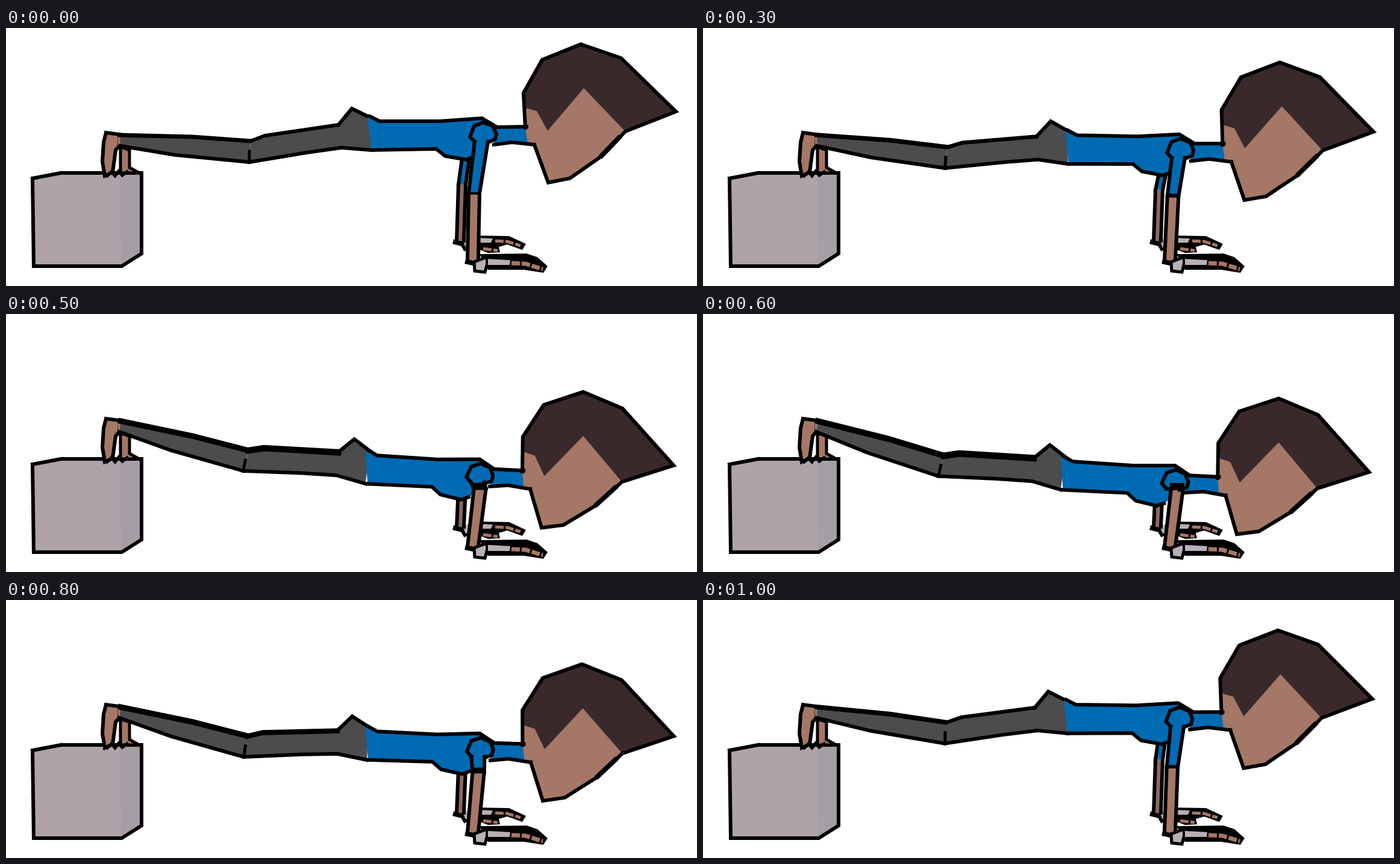
An HTML page with a canvas for the animation above (1100 ms loop, 1147 by 429 pixels).

```html
<!DOCTYPE html>
<html lang="en">
<head>
<meta charset="utf-8">
<title>Decline push-up</title>
<style>
html, body { margin: 0; width: 100%; height: 100%; overflow: hidden; background: #fff; }
canvas { display: block; }
</style>
</head>
<body>
<canvas id="stage" width="1147" height="429"></canvas>
<script>
const ctx = document.getElementById('stage').getContext('2d');
const INK = '#000', SKIN = '#a57766', SHADE = '#8c695f', HAIR = '#3a292b',
      PANTS = '#4c4b4e', SHIRT = '#006bb3', BAND = '#b9afb6';
const STEP = 100, LOOP = 1100;

// A bone is drawn in its rest place, then turned about a joint that has moved to (x, y)
const bone = (restX, restY, [x, y], degrees) => ({ restX, restY, x, y, angle: degrees * Math.PI / 180 });
function place(b, px, py) {
  const dx = px - b.restX, dy = py - b.restY, c = Math.cos(b.angle), s = Math.sin(b.angle);
  return [b.x + dx * c - dy * s, b.y + dx * s + dy * c];
}
function withBone(b, draw) {
  ctx.save();
  ctx.translate(b.x, b.y);
  ctx.rotate(b.angle);
  ctx.translate(-b.restX, -b.restY);
  draw();
  ctx.restore();
}

// Smooth way down until step `end`, then a curved way up until the loop closes
function dip(n, end, power) {
  if (n >= 6) return (1 - (n - 6) / 4) ** power;
  const p = Math.max(0, Math.min(1, (n - .6) / (end - .6)));
  return p * p * (3 - 2 * p);
}

function trace(points) {
  ctx.beginPath();
  for (const p of points.split(' ')) ctx.lineTo(...p.split(','));
}
function fill(points, color) {
  trace(points);
  ctx.fillStyle = color;
  ctx.fill();
}
function line(points, width = 6, color = INK) {
  trace(points);
  ctx.lineWidth = width;
  ctx.strokeStyle = color;
  ctx.stroke();
}
function shape(points, color, width = 6) {
  fill(points, color);
  line(points + ' ' + points.split(' ').slice(0, 2).join(' '), width);
}
function limb([ax, ay], aw, [bx, by], bw, color) {
  const left = `${ax - aw},${ay} ${bx - bw},${by}`, right = `${bx + bw},${by} ${ax + aw},${ay}`;
  fill(left + ' ' + right, color);
  line(left);
  line(right);
}
function fingers(points, width) {
  ctx.lineCap = 'butt';
  ctx.setLineDash([14, 3]);
  line(points, width, SKIN);
  ctx.setLineDash([]);
  ctx.lineCap = 'square';
}

function drawBox() {
  shape('44,250 91,241 225,241 225,375 192,396 46,396', '#ada3a8');
  fill('190,244 222,244 222,373 191,393', '#a69ea5');
}

function drawFeet() {
  shape('190,198 205,203 205,232 221,241 190,241', SKIN, 5);
  shape('189,177 166,174 162,190 160,222 164,246 177,240 182,203 188,196', SKIN);
  fill('186,180 191,180 191,194 186,194', SKIN);
  line('168,246 175,239 181,246 187,238 193,245 201,239', 5);
}

function drawCalf(weight) {
  const top = '189,178 310,181 406,188', under = '404,223 280,211 190,196';
  fill(top + ' ' + under, PANTS);
  line(top, weight);
  line(under);
}

function drawThigh(weight) {
  const back = '406,188 430,179 552,161', hump = '552,161 574,134 603,148', under = '607,203 557,199 500,207 404,223';
  fill(`${back} ${hump} ${under}`, PANTS);
  line(back, weight);
  line(hump);
  line(under);
  line('404,205 404,223', 5);
}

function drawTorso() {
  const back = '620,155 720,155 790,150 812,163', neck = '808,165 864,164', throat = '877,194 840,190 810,194',
        chest = '776,214 764,219 729,213 714,201 607,203';
  fill(`600,148 ${back} 812,185 ${chest}`, SHIRT);
  fill(`${neck} 866,192 ${throat}`, SHIRT);
  line('604,147 ' + back);
  line(chest);

  const crown = '859,108 890,53 954,27 1021,50 1112,139 1028,172';
  const face = `862,166 ${crown} 1013,188 986,215 936,250 900,257 877,194`;
  fill(face + ' 866,191', SKIN);
  fill(crown + ' 959,100 899,171 881,138 862,133', HAIR);
  line(face);
  line('1017,183 989,212', 8);
  line(neck);
  line(throat);
}

function drawBackHand() {
  fill('776,345 835,346 863,359 857,369 832,360 818,364 820,373 800,374 780,366', INK);
  line('746,356 758,359 762,366', 8);
  fill('757,351 784,349 808,350 805,357 786,357 763,365', BAND);
  fingers('812,354 832,355 854,362', 5);
  fingers('792,367 816,370', 5);
}

function drawFrontHand() {
  fill('786,376 864,375 882,381 899,396 892,407 860,402 800,402', INK);
  line('766,389 780,392', 8);
  shape('777,389 798,381 799,391 795,406 778,404', BAND, 5);
  fill('800,384 837,386 836,394 800,394', BAND);
  fingers('839,391 862,392 891,401', 7);
}

function drawPose(n) {
  const fold = dip(n, 4.4, 1.2), kneeDip = dip(n, 5.4, .82);
  const calf = bone(189, 187, [189, 187], 13 * kneeDip);
  const thigh = bone(404, 206, place(calf, 404, 206), 12 * dip(n, 4.4, 1.85));
  const torso = bone(604, 177, place(thigh, 604, 177), 3.9 * fold);

  drawBox();
  drawFeet();
  drawBackHand();
  const backElbow = [757, 260 + 30 * fold];
  limb(place(torso, 763, 217), 6, backElbow, 6, SHIRT);
  limb(backElbow, 6, [754, 354], 6, SHADE);

  withBone(calf, () => drawCalf(7 + 3 * kneeDip));
  withBone(thigh, () => drawThigh(6 + 5 * fold * fold));
  withBone(torso, drawTorso);

  const elbow = [777 + 10 * fold, 275 + 16 * fold], cuff = 4 + 8 * fold;
  limb(elbow, 9 + fold, [775, 387], 9, SKIN);
  const ball = '778,189 770,181 777,163 792,157 808,163 814,176 812,185 800,190';
  withBone(torso, () => { fill(ball, SHIRT); line(ball); });
  limb(place(torso, 789, 189), 11, elbow, 9 + fold, SHIRT);
  const cuffY = elbow[1] - cuff / 2 + 2;
  line(`${elbow[0] - 6},${cuffY} ${elbow[0] + 6},${cuffY}`, cuff);
  drawFrontHand();
}

ctx.miterLimit = 3;
ctx.lineCap = 'square';
function frame() {
  const t = performance.now() % LOOP;
  ctx.clearRect(0, 0, 1147, 429);
  drawPose(Math.max(0, Math.floor(t / STEP) - 1));
  requestAnimationFrame(frame);
}
frame();
</script>
</body>
</html>
```
